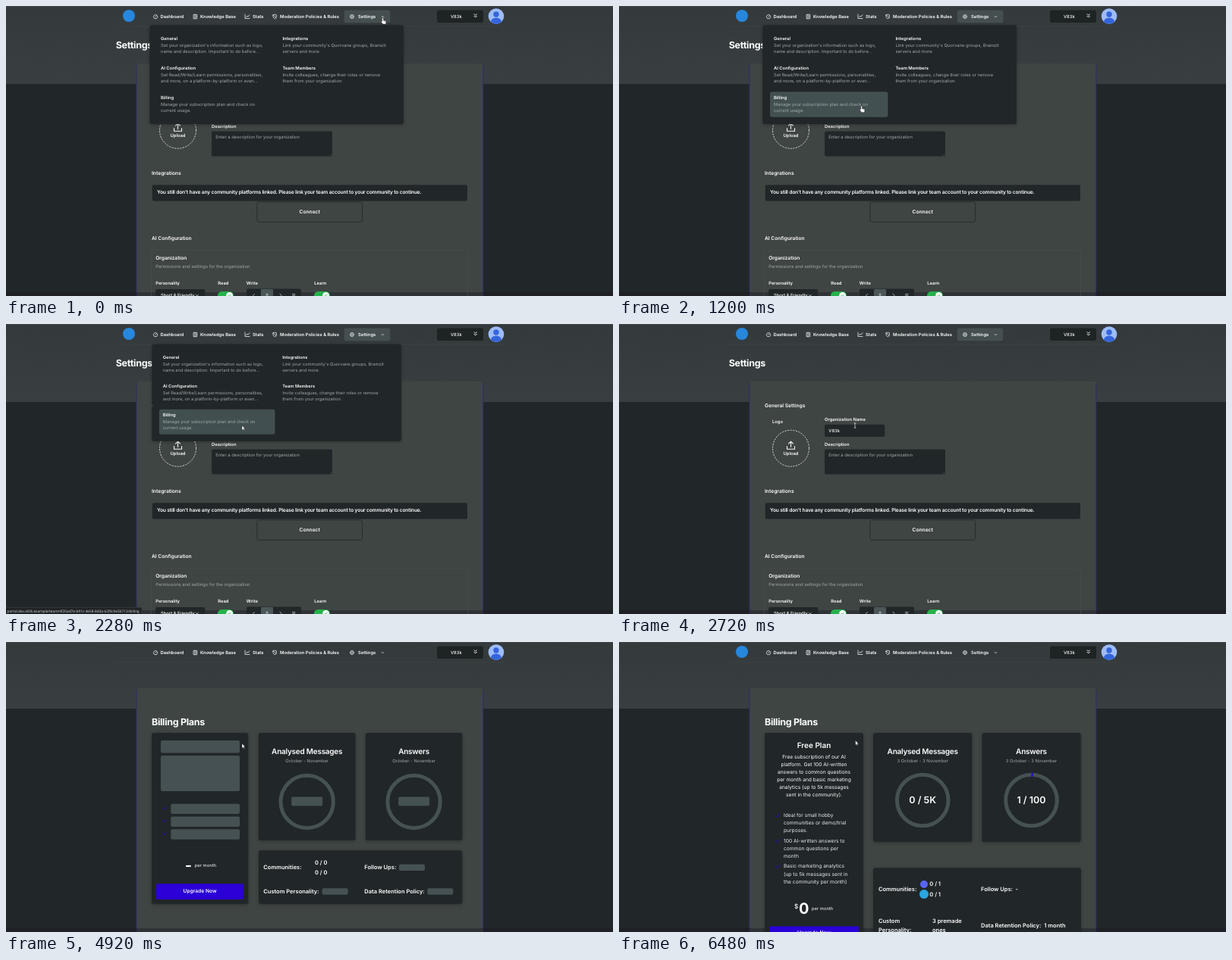
An HTML page that plays this animation: 800 px wide and 383 px high, repeating every 6.52 s.

```html
<!DOCTYPE html>
<html lang="en">
<head>
<meta charset="utf-8">
<title>Settings to billing</title>
<style>
  html, body { margin: 0; width: 100%; height: 100%; overflow: hidden; background: #23282b; }
  svg { display: block; width: 100vw; height: 100vh; }
  text { font-family: Inter, sans-serif; text-rendering: geometricPrecision; white-space: pre; }
  .raised { filter: drop-shadow(0 1px 2px rgba(0, 0, 0, .28)); }
  .line { fill: none; stroke: #f2f4f4; stroke-width: .75; stroke-linecap: round; stroke-linejoin: round; }
</style>
</head>
<body>
<svg id="stage" viewBox="0 0 800 383" preserveAspectRatio="none"></svg>
<script>
const LOOP = 6520, STEP = 40;
const SMALL = 5.83, BASE = 6.67, LABEL = 7.5, HEAD = 10, TITLE = 12.5;
const TIGHT = 'letter-spacing="-.025em"';
const C = {
  page: '#212728', blank: '#23282b', card: '#3f4543', dark: '#212628', hover: '#435051',
  bone: '#455153', white: '#fdfefe', grey: '#a2a9a9', indigo: '#2a00d6', logo: '#2787dc'
};
const ORG = 'V83k';
const LINK = 'portal.dev.v83k.example/team/4f20ad7e-b91c-4e58-8d3a-62f0c9e5b713/billing';

const rect = (x, y, x2, y2, fill, r = 0, extra = '') =>
  `<rect x="${x}" y="${y}" width="${x2 - x}" height="${y2 - y}" rx="${r}" fill="${fill}" ${extra}/>`;
const circle = (x, y, r, fill, extra = '') => `<circle cx="${x}" cy="${y}" r="${r}" fill="${fill}" ${extra}/>`;
const path = (d, extra = '') => `<path class="line" d="${d}" ${extra}/>`;
const group = (id, body, extra = '') => `<g id="${id}" ${extra}>${body}</g>`;

// y is the middle of the capitals
const text = (x, y, str, size = SMALL, weight = 400, fill = C.white, extra = '') =>
  `<text x="${x}" y="${(y + size * .364).toFixed(2)}" font-size="${size}" font-weight="${weight}" fill="${fill}" ${extra}>${str.replace(/&/g, '&amp;')}</text>`;
const centred = (x, y, str, size, weight, fill, extra = '') =>
  text(x, y, str, size, weight, fill, 'text-anchor="middle" ' + extra);
const lines = (x, y, gap, list, draw = text, ...style) =>
  list.map((str, i) => draw(x, y + i * gap, str, ...style)).join('');
const title = (x, y, str) => text(x, y, str, TITLE, 700, C.white, TIGHT);
const panel = (x, y, x2, y2) => rect(x, y, x2, y2, C.dark, 3, 'class="raised"');
const check = (x, y) => path(`M${x - 2.5} ${y}l1.7 1.8 3.4-3.8`, `style="stroke:${C.indigo};stroke-width:.9"`);
const footer = () => rect(0, 378, 800, 383, '#1b1824', 0, 'opacity=".4"');

function navBar() {
  const labels = [[203.5, 'Dashboard'], [256, 'Knowledge Base'], [325, 'Stats'],
    [361, 'Moderation Policies & Rules'], [464, 'Settings']];
  return rect(144, 26.6, 656, 27.3, '#454b4d', 0, 'opacity=".6"') +
    rect(445.7, 5.6, 506.3, 22.3, '#454f50', 3, 'id="active"') +
    labels.map(([x, str]) => text(x, 13.9, str, SMALL, 600)).join('') +
    path('M195.3 16.3a2.7 2.7 0 1 1 3.6 0zM197.1 14.3l1-1.3') +
    path('M247.5 11.3h4.2v5.4h-4.2zM249 11.3v5.4M250.2 13h.5M250.2 14.6h.5') +
    path('M315 11v5.5h6M316.4 14.8l1.5-1.7 1.2 1 1.9-2.4') +
    path('M352 11.8l2.2-.7 2.2.7v2.2c0 1.4-1 2.2-2.2 2.8-1.2-.6-2.2-1.4-2.2-2.8zM352 11.8l4.2 3.8') +
    circle(456, 14, 2.5, 'none', 'stroke="#dfe3e3" stroke-width=".9" stroke-dasharray="1.5 .46"') +
    circle(456, 14, 2.1, 'none', 'stroke="#dfe3e3" stroke-width=".6"') +
    circle(456, 14, .8, 'none', 'stroke="#dfe3e3" stroke-width=".6"') +
    path('M495.2 14.6l1.3-1.3 1.3 1.3', 'id="chevronUp"') +
    path('M495.2 13.5l1.3 1.3 1.3-1.3', 'id="chevronDown"') +
    rect(568, 5.5, 629, 22, '#1e2324', 2.5) +
    centred(593.3, 13.8, ORG, SMALL, 500) +
    path('M617 10.7l1.7 1.7 1.7-1.7M617 13.3l1.7 1.7 1.7-1.7', 'style="stroke-width:1"') +
    circle(646, 13.5, 10.3, '#9dbdf9') + circle(646, 11, 3.7, '#3565da') +
    '<path d="M639 20.9a7 5.4 0 0 1 14 0a10.3 10.3 0 0 1-14 0z" fill="#3565da"/>' +
    circle(162, 13, 8, C.logo, 'id="logo"');
}

const backdrop = (bandEnd, cardTop) =>
  rect(0, 0, 800, 383, C.page) + rect(0, 0, 800, bandEnd, 'url(#band)') +
  rect(172, cardTop, 629, 400, C.card, 3) +
  [171.9, 628.9].map(x => rect(x - .5, cardTop + 2, x + .5, 400, '#2f2a72')).join('') + footer();

function settingsPage() {
  const toggle = x => rect(x, 377, x + 21, 388, '#25b14c', 5.5) + circle(x + 15.6, 382.3, 4.4, '#fff') +
    path(`M${x + 14} 382l1.2 1.2 2.1-2.4`, 'style="stroke:#25b14c"');
  return backdrop(103, 76) + title(144.7, 51.6, 'Settings') +
    text(192, 108, 'General Settings', BASE, 600) +
    text(202, 128.5, 'Logo', SMALL, 600) +
    circle(226.5, 164.2, 24, 'none', 'stroke="#eef0f0" stroke-width=".85" stroke-dasharray="2.2 1.4"') +
    path('M221.5 161.5v3.7h10v-3.7M226.5 162.3v-7M223.6 158l2.9-2.9 2.9 2.9', 'style="stroke-width:1.1"') +
    centred(226.5, 171, 'Upload', SMALL, 600) +
    text(271, 126, 'Organization Name', SMALL, 600) +
    rect(271, 132.7, 350.3, 149, C.dark, 2) + text(276.3, 141.2, ORG, SMALL, 500) +
    text(271, 158.8, 'Description', SMALL, 600) +
    rect(271, 165.4, 430, 198.6, C.dark, 2) +
    text(276.3, 173, 'Enter a description for your organization', SMALL, 400, C.grey) +
    path('M427.4 197.4l1.5-1.5', 'style="stroke:#8a9090;stroke-width:.4"') +
    text(192, 220.8, 'Integrations', BASE, 600) +
    rect(192.7, 236.3, 608, 257.4, C.dark, 2) +
    text(199, 246, "You still don't have any community platforms linked. Please link your team account to your community to continue.", BASE, 600, C.white, TIGHT) +
    rect(330.9, 258.8, 469.5, 285.3, C.card, 2.5, 'stroke="#262b2c" stroke-width=".9"') +
    centred(400.2, 271.9, 'Connect', BASE, 600) +
    text(192, 307, 'AI Configuration', BASE, 600) +
    rect(191.5, 322.5, 608.5, 400, 'none', 3, 'stroke="#474d4c" stroke-width=".7"') +
    text(197.2, 332.8, 'Organization', BASE, 600) +
    text(197.2, 344.3, 'Permissions and settings for the organization', SMALL, 400, C.grey) +
    [[197.2, 'Personality'], [279.3, 'Read'], [316.8, 'Write'], [406.3, 'Learn']]
      .map(([x, str]) => text(x, 365.8, str, SMALL, 600)).join('') +
    rect(197.2, 374, 262.3, 390, C.dark, 2) + text(204, 382, 'Short & Friendly', SMALL, 500) +
    path('M250.5 381.5l1.4 1.4 1.4-1.4') +
    toggle(279) + toggle(406) +
    rect(317, 373.4, 389, 390, C.dark, 2) + rect(336, 374, 352, 390, '#4a5658', 1) +
    path('M325 383l2.6-2.6M344 383v-3.5M342.8 381.2h2.6M361 380l2.4 3M377.5 380.5h3.4M377.5 382.4h3.4', 'style="stroke:#c9cfcf"');
}

const ITEMS = [
  [0, 0, 'General', "Set your organization's information such as logo,", 'name and description. Important to do before...'],
  [1, 0, 'Integrations', "Link your community's Quorvane groups, Bramzit", 'servers and more.'],
  [0, 1, 'AI Configuration', 'Set Read/Write/Learn permissions, personalities,', 'and more, on a platform-by-platform or even...'],
  [1, 1, 'Team Members', 'Invite colleagues, change their roles or remove', 'them from your organization.'],
  [0, 2, 'Billing', 'Manage your subscription plan and check on', 'current usage.']
];
const itemBox = ([col, row]) => {
  const x = 199 + col * 160.4, y = 35.6 + row * 38.8;
  return [x, y, x + 155.4, y + 33.6];
};
const menu = () => rect(189.3, 25.3, 524, 156, C.dark, 3, 'class="raised"') +
  ITEMS.map(item => {
    const [x, y, x2, y2] = itemBox(item), [, , name, ...about] = item;
    return rect(x, y, x2, y2, C.hover, 3, 'class="item"') +
      text(x + 5, y + 7.6, name, SMALL, 600) +
      lines(x + 5, y + 16.4, 8.2, about, text, SMALL, 400, C.grey);
  }).join('');

const ring = (x, y, r) => circle(x, y, r, 'none', `stroke="${C.bone}" stroke-width="5"`);
const gaugeCard = (x, x2, bottom, name, period) => panel(x, 120, x2, bottom) +
  centred((x + x2) / 2, 144.8, name, HEAD, 600, C.white, TIGHT) +
  centred((x + x2) / 2, 156.6, period, SMALL, 400, C.grey);
const bold = (x, y, str) => text(x, y, str, LABEL, 600);

function skeleton() {
  const bone = (x, y, x2, y2) => rect(x, y, x2, y2, C.bone, 2);
  const gauge = (x, name) => gaugeCard(x - 63.8, x + 63.8, 262, name, 'October - November') +
    ring(x, 211, 34.7) + bone(x - 20.5, 204.5, x + 20.5, 216.5);
  return panel(192, 120, 319.3, 346) + bone(204, 130, 308, 146.5) + bone(204, 150, 308, 197) +
    [220.3, 237.1, 253.9].map(y => check(209, y - 1) + bone(217.2, y - 6.6, 308, y + 6.8)).join('') +
    text(235.8, 295, '-', 20, 600) + text(248.8, 295.3, 'per month') +
    rect(198, 319.3, 312.8, 340, C.indigo, 1.5) + centred(255.5, 329, 'Upgrade Now', BASE, 600) +
    gauge(396.7, 'Analysed Messages') + gauge(537.6, 'Answers') +
    panel(333, 275.3, 601.3, 346) +
    bold(339.3, 297.3, 'Communities:') + bold(407, 290.8, '0 / 0') + bold(407, 304.1, '0 / 0') +
    bold(472.3, 297.3, 'Follow Ups:') + bone(518, 293.5, 552, 302) +
    bold(339.3, 329.3, 'Custom Personality:') + bone(416.7, 325.3, 450.7, 333.8) +
    bold(472.3, 329.3, 'Data Retention Policy:') + bone(555.3, 325.3, 589.3, 333.8);
}

function plans() {
  const gauge = (x, name, value) => gaugeCard(x - 65.1, x + 65.1, 264, name, '3 October - 3 November') +
    ring(x, 209, 33.8) + centred(x, 208.3, value, TITLE, 600);
  const perks = [
    ['Ideal for small hobby', 'communities or demo/trial', 'purposes.'],
    ['100 AI-written answers to', 'common questions per', 'month'],
    ['Basic marketing analytics', '(up to 5k messages sent in', 'the community per month)']];
  return panel(192, 120, 322, 400) + centred(257, 136.1, 'Free Plan', HEAD, 600) +
    lines(257, 151.8, 10, ['Free subscription of our AI', 'platform. Get 100 AI-written', 'answers to common questions',
      'per month and basic marketing', 'analytics (up to 5k messages', 'sent in the community).'], centred, BASE) +
    perks.map((perk, i) => check(209, 229.3 + i * 33.6) +
      lines(217, 228.8 + i * 33.6, 10.1, perk, text, BASE, 400, '#e8ecec')).join('') +
    text(231, 349, '$', 8.33, 500) + text(237, 351.7, '0', 20, 700) + text(254, 351.5, 'per month') +
    rect(198, 375.6, 316, 397, C.indigo, 1.5) + centred(257, 384, 'Upgrade Now', BASE, 600) +
    gauge(400.2, 'Analysed Messages', '0 / 5K') + gauge(543.5, 'Answers', '1 / 100') +
    `<path d="M543.5 175.2a33.8 33.8 0 0 1 2.1.07" fill="none" stroke="${C.indigo}" stroke-width="5"/>` +
    panel(335, 298.3, 609, 400) +
    bold(342, 326.1, 'Communities:') + circle(402, 320, 5, '#5865f2') + circle(402, 333, 6, '#2ba5e0') +
    bold(409.3, 319.6, '0 / 1') + bold(409.3, 332.8, '0 / 1') +
    bold(477, 326.1, 'Follow Ups:') + bold(522.5, 326.1, '-') +
    lines(342, 368.5, 11.7, ['Custom', 'Personality:'], bold) +
    lines(413, 368.5, 11.7, ['3 premade', 'ones'], bold) +
    bold(477, 374.3, 'Data Retention Policy:') + bold(560.3, 374.3, '1 month');
}

const pointers = {
  hand: 'M0 0c.6 0 1 .4 1 1v2.6l2.5.7c.7.2 1 .7.9 1.4L4 8.6H.3L-2.1 5.4c-.4-.6.3-1.2.9-.8l.4.4V1c0-.6.3-1 .8-1z',
  arrow: 'M0 0V6.2L1.4 4.9 2.3 7l1-.4-.9-2H4.2z',
  beam: 'M-1.3-3.2h2.6M0-3.2v6.4M-1.3 3.2h2.6'
};
const pointerShapes = Object.entries(pointers).map(([id, d]) =>
  `<path id="${id}" d="${d}" ${id === 'beam' ? 'fill="none" stroke="#e8eaea" stroke-width=".7"'
    : 'fill="#fff" stroke="#111" stroke-width=".4"'}/>`).join('');

const $ = id => document.getElementById(id);
$('stage').innerHTML =
  `<defs><linearGradient id="band" x1="0" y1="0" x2="0" y2="1"><stop stop-color="#343a3c"/><stop offset="1" stop-color="#393f41"/></linearGradient></defs>` +
  rect(0, 0, 800, 383, C.blank) + footer() +
  group('settings', settingsPage()) +
  group('billing', backdrop(88, 61) + title(192, 105.6, 'Billing Plans') +
    group('loading', skeleton()) + group('loaded', plans())) +
  group('nav', navBar()) + group('menu', menu()) +
  rect(0, 0, 800, 1, '#fff', 0, 'opacity=".07"') +
  group('status', rect(-1, 374.3, 178.8, 384, '#202427', 1, 'stroke="#3d4245" stroke-width=".6"') +
    text(1.5, 379, LINK, 4.75, 400, '#d5d9da', 'style="font-family:\'Open Sans\',sans-serif"')) +
  group('pointer', pointerShapes);

// time, x, y of the pointer tip
const route = [[0, 496.5, 15.5], [160, 494, 20], [520, 425, 66], [840, 345, 122], [1120, 319.5, 132],
  [1480, 319.5, 132], [2000, 311, 134], [5800, 311, 134], [6480, 311.6, 130], [LOOP, 311.6, 130]];
function pointerAt(t) {
  const i = Math.max(1, route.findIndex(stop => stop[0] > t));
  const [t0, x0, y0] = route[i - 1], [t1, x1, y1] = route[i];
  const p = (t - t0) / (t1 - t0);
  return [x0 + (x1 - x0) * p, y0 + (y1 - y0) * p];
}

const show = (id, on) => { $(id).style.display = on ? '' : 'none'; };
const items = [...document.querySelectorAll('.item')];

function render(time) {
  const t = Math.floor(time % LOOP / STEP) * STEP;
  const closing = Math.min(1, Math.max(0, (t - 2240) / 110));
  const onSettings = t < 3360, onBilling = t >= 4920, open = closing < 1;
  const [x, y] = pointerAt(t);

  show('settings', onSettings);
  show('billing', onBilling);
  show('nav', onSettings || onBilling);
  show('active', onSettings);
  show('chevronUp', open);
  show('chevronDown', !open);
  show('logo', t < 4920 || t >= 5000);
  show('loading', t < 5720);
  show('loaded', t >= 5720);
  show('status', t >= 1400 && t < 2440);
  show('menu', open);
  $('menu').setAttribute('opacity', 1 - closing ** 4);
  $('menu').setAttribute('transform', `translate(356.6 90.6) scale(${1 - .05 * closing}) translate(-356.6 -90.6)`);

  let hovering = false;
  ITEMS.forEach((item, i) => {
    const [x0, y0, x1, y1] = itemBox(item);
    const inside = x > x0 && x < x1 && y > y0 && y < y1;
    hovering ||= inside;
    items[i].style.display = inside ? '' : 'none';
  });

  const kind = t < 2240 ? (hovering || y < 24 ? 'hand' : 'arrow') : open || !onSettings ? 'arrow' : 'beam';
  Object.keys(pointers).forEach(id => show(id, id === kind));
  $('pointer').setAttribute('transform', `translate(${x.toFixed(2)} ${y.toFixed(2)})`);
}

const start = performance.now();
function tick() {
  render(performance.now() - start);
  requestAnimationFrame(tick);
}
tick();
</script>
</body>
</html>
```
